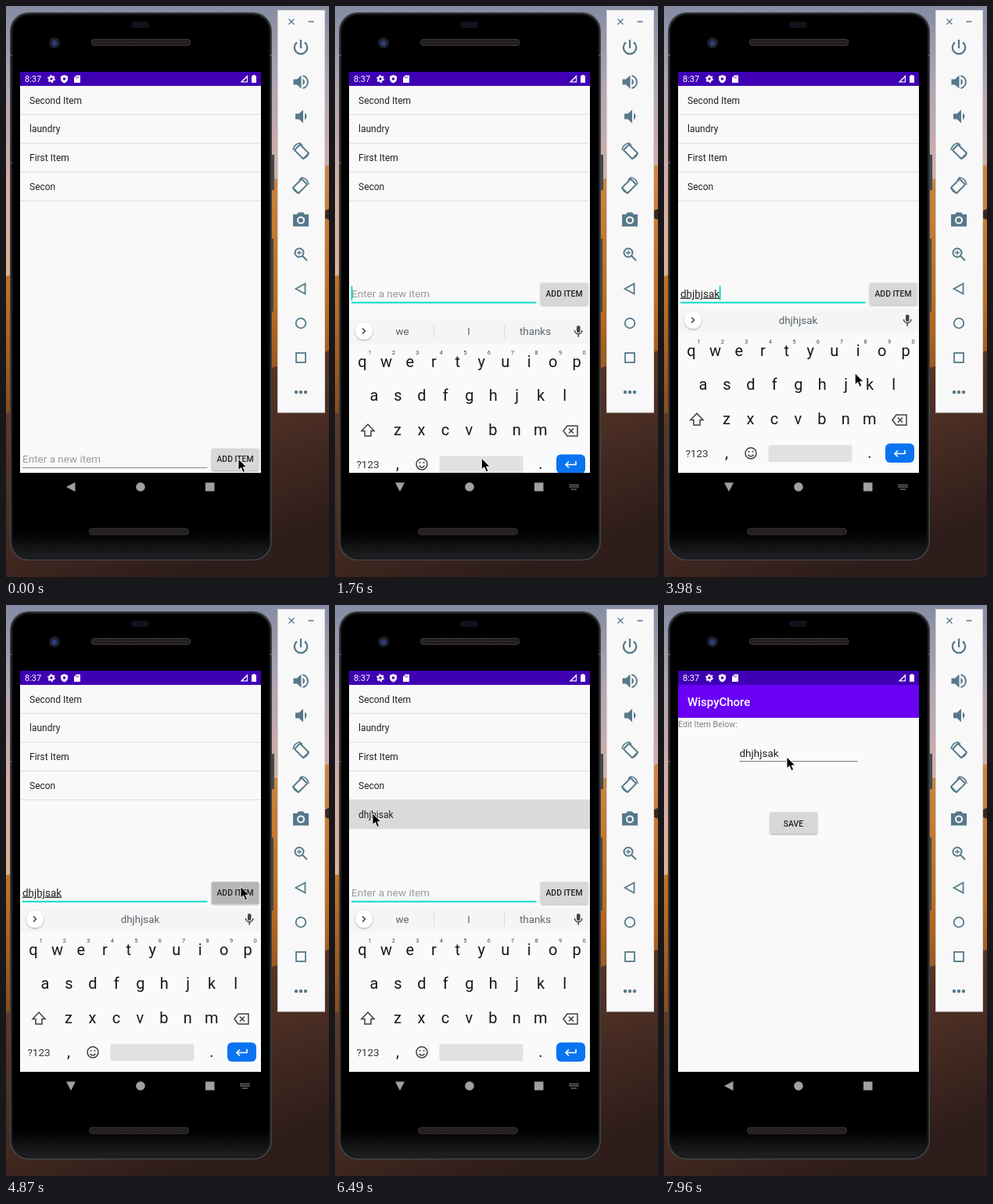
An HTML page for the animation above (8 s loop, 413 px wide and 729 px high).

```html
<!DOCTYPE html>
<html lang="en">
<head>
<meta charset="utf-8">
<title>To-do list on a phone</title>
<style>
html, body { margin: 0; width: 100%; height: 100%; overflow: hidden; }
svg { display: block; width: 413px; height: 729px; font-family: Roboto, sans-serif; }
text { white-space: pre; }
.mid { text-anchor: middle; }
.row { font-size: 12px; fill: #222; }
.field { font-size: 13.5px; fill: #222; }
.caps { font-size: 10.4px; font-weight: 500; fill: #222; text-anchor: middle; }
.chip { font-size: 13.4px; fill: #5f6368; text-anchor: middle; }
.key { font-size: 20px; fill: #16181a; text-anchor: middle; }
.digit { font-size: 7.5px; fill: #444; text-anchor: middle; }
.line { fill: none; stroke: #3c4043; stroke-width: 1.5; }
.tool { fill: none; stroke: #56798a; stroke-width: 2; }
.solid { fill: #56798a; stroke: none; }
</style>
</head>
<body>
<svg viewBox="0 0 413 729">
<defs>
  <linearGradient id="sky" x2="0" y2="1">
    <stop offset="0" stop-color="#858ca3"/><stop offset=".3" stop-color="#b3a7b3"/>
    <stop offset=".65" stop-color="#d6aea6"/><stop offset="1" stop-color="#dfb193"/>
  </linearGradient>
  <linearGradient id="sand" x2="0" y2="1">
    <stop offset="0" stop-color="#cc8740"/><stop offset=".5" stop-color="#bd6c20"/><stop offset="1" stop-color="#75421f"/>
  </linearGradient>
  <linearGradient id="shade" x2=".5" y2="1">
    <stop offset="0" stop-color="#6b3f25"/><stop offset=".6" stop-color="#4b2e24"/><stop offset="1" stop-color="#2e1d1a"/>
  </linearGradient>
  <linearGradient id="glass" x2="0" y2="1">
    <stop offset=".95" stop-color="#000"/><stop offset="1" stop-color="#202123"/>
  </linearGradient>
  <filter id="soft" x="-20%" y="-20%" width="140%" height="150%">
    <feDropShadow dx="0" dy="1" stdDeviation=".8" flood-opacity=".35"/>
  </filter>
  <clipPath id="screen"><path d="M18 84h308v512h-308z"/></clipPath>
</defs>

<!-- desktop -->
<rect width="413" height="350" fill="url(#sky)"/>
<path d="M0 345L170 300L340 222L413 203V560H0Z" fill="url(#sand)"/>
<path d="M404 263L413 259V273L404 269Z" fill="#3b2a22"/>
<path d="M0 520L200 490L340 462L413 440V729H0Z" fill="url(#shade)"/>

<!-- phone body -->
<path d="M339 190h4v45h-4zM339 297h3v93h-3z" fill="#44484b"/>
<rect x="5" y="8" width="335" height="700" rx="24" fill="#404548"/>
<rect x="7.5" y="10.5" width="330" height="695" rx="22" fill="url(#glass)" stroke="#17191a" stroke-width="2"/>
<path d="M5 63h3M5 200h3M337 63h3" stroke="#777"/>
<g fill="#221e1e" stroke="#3a3737">
  <rect x="109" y="42.500" width="127" height="8" rx="4"/>
  <rect x="106.500" y="667" width="127" height="8" rx="4"/>
</g>
<path d="M112 46.500H233M110 671H230" stroke="#43302d" stroke-dasharray="2 2"/>
<circle cx="62" cy="47" r="7" fill="#1d1f2b"/><circle cx="62" cy="47.500" r="3.500" fill="#2e3a78"/>
<rect x="160" y="20" width="23" height="8" rx="4" fill="#11121c"/>

<!-- list page -->
<g clip-path="url(#screen)">
  <rect x="18" y="84" width="308" height="512" fill="#f9f9f9"/>
  <rect id="touched" x="18" y="249" width="308" height="36.500"/>
  <g id="rows"></g>
  <g id="entry">
    <text id="hint" class="field" x="21" y="583" style="fill:#9b9b9b">Enter a new item</text>
    <text id="typed" class="field" x="21" y="583" text-decoration="underline"></text>
    <rect id="underline" x="21" width="236.500"/>
    <rect id="caret" y="569" width="1.800" height="18" fill="#03dac5"/>
    <rect id="add" x="263" y="565" width="60.500" height="28" rx="1.500" filter="url(#soft)"/>
    <text class="caps" x="293" y="582">ADD ITEM</text>
  </g>
  <g id="keyboard">
    <rect x="18" y="387" width="308" height="209" fill="#f8fafb"/>
    <rect x="18" y="387" width="308" height="30" fill="#f3f5f6"/>
    <circle cx="37" cy="401" r="11" fill="#fff" filter="url(#soft)"/>
    <path class="line" d="M35 397.500l3.500 3.500l-3.500 3.500"/>
    <g id="chips">
      <path d="M126.500 393v17M216.500 393v17" stroke="#d8dadc"/>
      <text class="chip" x="86" y="406">we</text>
      <text class="chip" x="171" y="406">I</text>
      <text class="chip" x="256" y="406">thanks</text>
    </g>
    <text id="guess" class="chip" x="171.500" y="406"></text>
    <rect x="309" y="394" width="4.500" height="9" rx="2.200" fill="#444"/>
    <path class="line" d="M306.500 400a4.700 4.700 0 0 0 9.400 0M311.200 405v3.500"/>
    <g id="keys"></g>
    <path class="line" d="M42 520l8 8.500h-4v6.500h-8v-6.500h-4z"/>
    <path class="line" d="M292 528.500l5-6.500h13v13h-13zM299 525.500l6 6m0-6l-6 6"/>
    <text class="mid" x="42" y="576" font-size="13.500" fill="#333">?123</text>
    <text class="key" x="80" y="577">,</text>
    <text class="key" x="263" y="577">.</text>
    <circle class="line" cx="111" cy="571" r="7"/>
    <path class="line" d="M107.500 573q3.500 4 7 0M107.500 569h2M112.500 569h2"/>
    <rect x="133.500" y="560.500" width="107" height="21.500" rx="2" fill="#e0e2e2"/>
    <rect x="283" y="558.500" width="37" height="24.500" rx="6" fill="#0a73f0"/>
    <path d="M308 567v4.500h-13m4-4l-4 4l4 4" fill="none" stroke="#fff" stroke-width="1.600"/>
  </g>
</g>
<rect x="18" y="84" width="308" height="18" fill="#3f00b4"/>

<!-- edit page -->
<rect id="behind" x="18" y="90" width="308" height="517" fill="#fff"/>
<g id="page">
  <rect x="18" y="84" width="308" height="548"/>
  <rect x="18" y="84" width="308" height="512" fill="#fafafa"/>
  <rect x="18" y="84" width="308" height="19" fill="#3f00b4"/>
  <rect x="18" y="102" width="308" height="42" fill="#6a00f4"/>
  <text x="30" y="129" font-size="15" font-weight="500" fill="#fff">WispyChore</text>
  <text x="18" y="156" font-size="10.600" fill="#808080">Edit Item Below:</text>
  <text class="field" x="96.500" y="194">dhjhjsak</text>
  <rect x="96.500" y="199" width="151" height="1.200" fill="#888"/>
  <rect x="135.500" y="264.500" width="60.500" height="27.500" rx="1.500" fill="#d6d7d7" filter="url(#soft)"/>
  <text class="caps" x="165.500" y="282.500">SAVE</text>
</g>

<!-- status and navigation bars -->
<g fill="#fff">
  <text x="24" y="97" font-size="11">8:37</text>
  <circle cx="58" cy="93" r="2.700" fill="none" stroke="#fff" stroke-width="2"/>
  <circle cx="58" cy="93" r="4.200" fill="none" stroke="#fff" stroke-width="1.500" stroke-dasharray="2.200"/>
  <path d="M74.500 88l4.500 1.800v3.200q0 3.600-4.500 5.400q-4.500-1.800-4.500-5.400v-3.200z"/>
  <path d="M90 88.500h5v9.500h-8v-6.500zM309 88v9.500h-9.500zM315.500 88h3v1.200h1.500v8.800h-6v-8.800h1.500z"/>
</g>
<circle cx="74.500" cy="93" r="1.800" fill="#3f00b4"/>
<path d="M90 90v2.500M92 90v2.500M305 94.500l2.500-2.500v4h-4z" stroke="#3f00b4" stroke-width=".8" fill="#3f00b4"/>
<g fill="#a0a0a0">
  <path id="back" d="M-6 0L5.500-6V6Z"/>
  <circle cx="172" cy="614" r="5.800"/>
  <rect x="255" y="608.500" width="11.500" height="11"/>
  <path id="switcher" d="M299.500 611.500h12M299.500 614h12M302 617h7" stroke="#8d8d8d" stroke-width="1.500" stroke-dasharray="1.500 .6"/>
</g>

<!-- emulator toolbar -->
<rect x="347.500" y="5.500" width="60" height="513.500" fill="#f8f8f8" stroke="#d5d2d2"/>
<path class="tool" style="stroke-width:1.300" d="M361.500 16.500l7 7m0-7l-7 7M386.500 20h7"/>
<g class="tool">
  <path transform="translate(377 53)" stroke-width="2.300" d="M0-10V1M-5-6.500a8.200 8.200 0 1 0 10 0"/>
  <g transform="translate(377 97)">
    <path class="solid" d="M-9.500-3.500h4.500l5.500-5v17l-5.500-5h-4.500zM2.500-4.500q5 4.500 0 9z"/>
    <path d="M2.500-8a8.200 8.200 0 0 1 0 16"/>
  </g>
  <path class="solid" transform="translate(377 141)" d="M-7-3.500h4.500l5.500-5v17l-5.500-5h-4.500zM5-4.500q5 4.500 0 9z"/>
  <g id="turn" transform="translate(377 185)">
    <rect x="-5" y="-8" width="10" height="16" rx="1" transform="translate(1 1) rotate(-45)"/>
    <path stroke-width="1.600" d="M-10-1A10 10 0 0 1-1-10L2-7M10 2A10 10 0 0 1 2 10"/>
  </g>
  <use href="#turn" transform="matrix(-1 0 0 1 754 44)"/>
  <path class="solid" fill-rule="evenodd" d="M367 266h5l2-2.500h6l2 2.500h5v15.500h-20zM377 268.500a5 5 0 1 0 .1 0z"/>
  <circle class="solid" cx="377" cy="273.500" r="3"/>
  <circle cx="375" cy="315" r="5.500"/>
  <path d="M379 319l6 6"/>
  <path stroke-width="1.300" d="M372 315h6M375 312v6"/>
  <path stroke-width="1.800" d="M370.500 361l12-6.500v13z"/>
  <circle cx="377" cy="405" r="6.300" stroke-width="1.800"/>
  <rect x="371" y="443" width="12" height="12" stroke-width="1.800"/>
  <g class="solid"><circle cx="371" cy="493" r="2.200"/><circle cx="377" cy="493" r="2.200"/><circle cx="383" cy="493" r="2.200"/></g>
</g>

<path id="pointer" d="M0 0V14.500L3.500 11.500L6 17.500L8.600 16.300L6.200 10.800H10.800Z" stroke="#fff" stroke-width=".9"/>
</svg>

<script>
const LOOP = 8000, START = 420, STEP = 147.8, WORD = 'dhjhjsak';
const $ = id => document.getElementById(id);
const show = (id, on) => { $(id).style.display = on ? '' : 'none'; };
const set = (id, attrs) => { for (const k in attrs) $(id).setAttribute(k, attrs[k]); };
const within = (s, ...spans) => spans.some(([from, to]) => s >= from && s < to);

$('rows').innerHTML = ['Second Item', 'laundry', 'First Item', 'Secon', WORD].map((label, i) =>
  `<g id="row${i}"><text class="row" x="30" y="${124.5 + 36.8 * i}">${label}</text>
   <rect x="18" y="${138 + 36.75 * i}" width="308" height="1" fill="#dedede"/></g>`).join('');

$('keys').innerHTML = [['qwertyuiop', 35, 447], ['asdfghjkl', 50, 490], ['zxcvbnm', 80, 534]]
  .map(([letters, x, y], r) => [...letters].map((c, i) => {
    const cx = x + 30.45 * i;
    const digit = r ? '' : `<text class="digit" x="${cx + 9.5}" y="431">${(i + 1) % 10}</text>`;
    return `<text class="key" x="${cx}" y="${y}">${c}</text>${digit}`;
  }).join('')).join('');

// pointer stops: step, x, y
const STOPS = [[0, 297, 578], [4, 187, 577], [22, 188.5, 578], [28, 300, 359.5], [31, 300, 359.5], [35, 46, 268],
  [36, 46, 268], [39, 48, 266], [44, 48, 266], [48, 122, 178], [50, 164, 166], [52, 157, 194]];

function pointerAt(s) {
  const i = Math.max(1, STOPS.findIndex(p => p[0] >= s));
  const [a, b] = [STOPS[i - 1], STOPS[i]];
  const k = (s - a[0]) / (b[0] - a[0]), e = k * k * (3 - 2 * k);
  return [1, 2].map(n => a[n] + (b[n] - a[n]) * e);
}

function draw(t) {
  const s = t < START ? 0 : Math.min(52, 1 + Math.floor((t - START) / STEP));
  const focused = s >= 5, raised = s >= 9, editing = s >= 43, typing = within(s, [15, 32]);
  const text = typing ? WORD.slice(0, (s - 14) * 2 - 1) : '';

  set('pointer', { transform: `translate(${pointerAt(s)})` });

  set('entry', { transform: `translate(0 ${raised ? -211.5 : 0})` });
  set('underline', focused ? { y: 589.2, height: 1.9, fill: '#03dac5' } : { y: 589, height: 1, fill: '#888' });
  set('add', { fill: s === 31 ? '#b5b6b6' : s === 32 ? '#c6c7c7' : '#d6d7d7' });
  $('typed').textContent = text;
  show('hint', !text);
  show('caret', within(s, [5, 13], [15, 21], [23, 27], [32, 35], [38, 41]));
  set('caret', { x: 20.6 + (text ? $('typed').getComputedTextLength() : 0) });

  show('row4', s >= 32);
  show('touched', s >= 41);
  set('touched', { fill: s === 41 ? '#e6e6e6' : '#dadada' });

  show('keyboard', raised && !editing);
  set('keyboard', { transform: `translate(0 ${s === 9 ? 90 : s === 10 ? 14 : 0})` });
  show('chips', !typing);
  $('guess').textContent = s < 20 ? text.slice(0, -1) : text;

  show('page', editing);
  show('behind', within(s, [43, 45]));
  const scale = s === 43 ? 0.975 : s === 44 ? 0.995 : 1;
  set('page', { transform: `translate(172 340) scale(${scale}) translate(-172 -340)` });

  const turn = editing ? (s === 43 ? 45 : 0) : s < 7 ? 0 : s === 7 ? 25 : s === 8 ? 68 : 90;
  set('back', { transform: `translate(83 614) rotate(${-turn})` });
  show('switcher', s >= 7 && !editing);
}

function tick() {
  draw(performance.now() % LOOP);
  requestAnimationFrame(tick);
}
tick();
</script>
</body>
</html>
```
